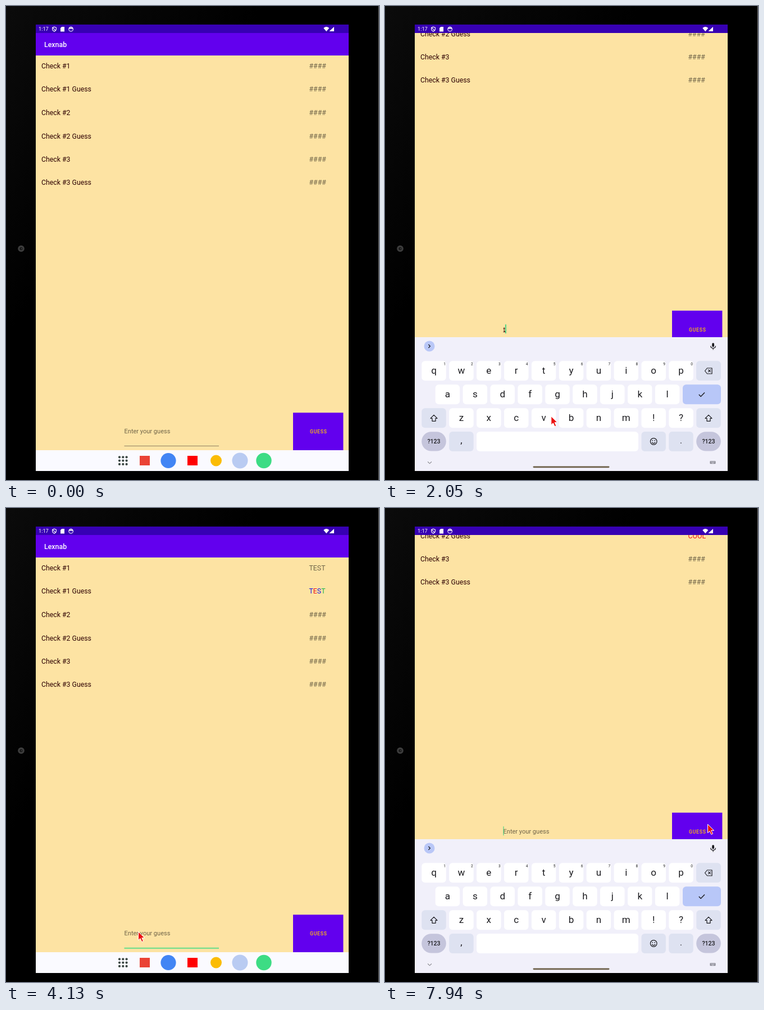
Write an HTML page that moves like this. It is 664x843 px and loops after 8 s.

```html
<!DOCTYPE html>
<html lang="en">
<head>
<meta charset="utf-8">
<title>Word game on a tablet</title>
<style>
  html, body { margin: 0; width: 100%; height: 100%; overflow: hidden; background: #000; }
  svg { display: block; width: 664px; height: 843px; }
  text { font-family: Roboto, sans-serif; white-space: pre; }
</style>
</head>
<body>
<svg id="stage" viewBox="0 0 664 843" xmlns="http://www.w3.org/2000/svg">
  <defs>
    <linearGradient id="shell" x2="1" y2="1">
      <stop offset="0" stop-color="#0b0b0b"/><stop offset=".35" stop-color="#000"/>
    </linearGradient>
    <clipPath id="screen"><rect x="53" y="48" width="557" height="779"/></clipPath>
  </defs>
  <rect width="664" height="843" fill="url(#shell)"/>
  <rect x="53" y="33" width="557" height="794"/>
  <rect x="663" width="1" height="843" fill="#777"/>
  <circle cx="27" cy="431.5" r="5.8" fill="#3d3d3d"/>
  <circle cx="27" cy="431.5" r="2.6" fill="#151515"/>
  <circle cx="27.6" cy="431.5" r="1" fill="#4a4a4a"/>

  <rect x="53" y="33" width="557" height="15" fill="#3700b3"/>
  <text x="58" y="44.3" font-size="9.2" fill="#fff">1:17</text>
  <g fill="none" stroke="#fff" stroke-width="1.1">
    <path d="M86 37.2l3.4 1.3v2.6q0 2.8-3.4 4.2q-3.4-1.4-3.4-4.2v-2.6zM83.5 38.8l5 5"/>
    <circle cx="115.6" cy="41.2" r="3.8"/>
    <path d="M112.2 39.6h6.8" stroke-width="2"/>
  </g>
  <path d="M97 39.3l2.3-2.3h4.7v8.4h-7z" fill="#fff"/>
  <path d="M565.3 39.2q5-4.2 10 0l-5 6zM584 37v8h-8.5z" fill="#fff"/>

  <g clip-path="url(#screen)">
    <g id="app"></g>
    <g id="taskbar"></g>
    <g id="keyboard"></g>
  </g>
  <rect id="handle" x="263.5" y="818.4" width="136" height="2.8" rx="1.4"/>
  <path id="cursor" d="M.5.5V15.8L4 12.6 6.8 18.6 9.5 17.4 6.8 11.5H11.6Z"
        fill="#ec1010" stroke="#fff" stroke-width="1"/>
</svg>
<script>
const LOOP = 8000, PAN = 181.5, KB_H = 238;
const SEND_1 = 3440, SEND_2 = 7880;
const $ = id => document.getElementById(id);
const app = $('app'), taskbar = $('taskbar'), kb = $('keyboard');

function el(parent, tag, attrs, text) {
  const n = document.createElementNS('http://www.w3.org/2000/svg', tag);
  for (const k in attrs) n.setAttribute(k, attrs[k]);
  if (text !== undefined) n.textContent = text;
  parent.appendChild(n);
  return n;
}
const rect = (p, x, y, width, height, fill, rx = 0) => el(p, 'rect', { x, y, width, height, fill, rx });
const dot = (p, cx, cy, r, fill) => el(p, 'circle', { cx, cy, r, fill });
const label = (p, x, y, size, fill, str, more) =>
  el(p, 'text', { x, y, 'font-size': size, fill, ...more }, str);
const mid = { 'text-anchor': 'middle' };
const line = (p, d, stroke = '#1b1b1f', width = 1.2) =>
  el(p, 'path', { d, fill: 'none', stroke, 'stroke-width': width, 'stroke-linejoin': 'round' });
const show = (n, on) => n.setAttribute('visibility', on ? 'inherit' : 'hidden');

// App window
const FAINT = 'rgba(0,0,0,.56)';
rect(app, 53, 48, 557, 742, '#fde3a3');
rect(app, 53, 48, 557, 40, '#6200ee');
label(app, 68, 73.3, 12.4, '#fff', 'Lexnab', { 'font-weight': 500 });
const slots = [111.4, 152.4, 193.6, 235.5, 276.5, 317.5].map((y, i) => {
  label(app, 63, y, 12.3, '#2e0202', `Check #${(i >> 1) + 1}${i % 2 ? ' Guess' : ''}`);
  return label(app, 539.5, i === 2 ? y + .8 : y, 12.3, FAINT, '####');
});

function fill(slot, word, colors) {
  if (slot.dataset.word === word) return;
  slot.dataset.word = word;
  slot.textContent = '';
  [...word].forEach((c, i) => el(slot, 'tspan', { fill: colors ? colors[i] : FAINT }, c));
}

const lift = el(app, 'g', {});
rect(lift, 512, 725, 93, 68, 'rgba(0,0,0,.05)', 2);
rect(lift, 512, 725, 90, 67, 'rgba(0,0,0,.08)', 2);
rect(app, 511, 723.3, 89.4, 66.7, '#6200ee');
label(app, 556.4, 760, 8.6, '#ffc107', 'GUESS',
  { ...mid, 'font-weight': 500, 'letter-spacing': .77 });
const hint = label(app, 210.5, 760.3, 11.05, FAINT, 'Enter your guess');
const typed = label(app, 210.5, 760.3, 11.05, '#2e0202', '');
const composing = rect(app, 210.5, 760.6, 0, 1, '#2e0202');
const caret = rect(app, 210.5, 747.8, 1, 16, '#2fd07c');
const under = rect(app, 210.5, 782, 168.5, 1, '#8e8262');

// Taskbar
rect(taskbar, 53, 790, 557, 37, '#fafaff');
for (let i = 0; i < 9; i++)
  dot(taskbar, 202 + i % 3 * 6.3, 802.3 + Math.floor(i / 3) * 6.3, 2.1, '#3b4743');
rect(taskbar, 238, 800, 18, 17, '#ea4335');
dot(taskbar, 289, 808.5, 13.6, '#4285f4');
rect(taskbar, 323, 800, 18, 17, '#f00');
dot(taskbar, 374, 808.5, 10, '#fbbc04');
dot(taskbar, 416.5, 808.5, 14, '#b9cbf2');
dot(taskbar, 459, 808.5, 13.7, '#3ddc84');

// Keyboard
const STEP = 48.9, KEY = '#dee2f1', INK = '#1b1b1f';
const panel = rect(kb, 53, 589, 557, KB_H, '#f1f0fa');
const caps = el(kb, 'g', {});
const pills = [];
const cap = (cx, cy, w, color) => rect(caps, cx - w / 2, cy - 17.5, w, 35, color, 6);

function letters(str, x, y) {
  [...str].forEach((c, i) => {
    cap(x + i * STEP, y, 43.5, '#fff');
    label(kb, x + i * STEP, y + 5.6, 17, INK, c, mid);
  });
}
letters('qwertyuiop', 87, 648.8);
letters('asdfghjkl', 111.4, 690.8);
letters('zxcvbnm!?', 135.9, 732.8);
[...'1234567890'].forEach((c, i) => label(kb, 106 + i * STEP, 639, 6.5, INK, c, mid));

cap(576, 648.8, 44, KEY);
line(kb, 'M569.5 649l4-5h8.5v10h-8.5zM575.2 646.6l4.6 4.6M579.8 646.6l-4.6 4.6');
cap(564, 690.8, 68, '#b8c7f8');
line(kb, 'M558.8 691l3.4 3.4 6.8-7', INK, 1.4);
for (const x of [87, 576]) {
  cap(x, 732.8, 43.5, KEY);
  line(kb, `M${x} 727.3l6 6h-3v5h-6v-5h-3z`);
  pills.push(rect(kb, x - 21.8, 757.2, 43.6, 34.4, '#c5c5dc', 17));
  label(kb, x, 778.3, 10.6, INK, '?123', { ...mid, 'font-weight': 500 });
}
[135.9, 478.2, 527].forEach(x => cap(x, 774.5, 43.5, KEY));
cap(307, 774.5, 288, '#fff');
label(kb, 135.9, 777.5, 17, INK, ',', mid);
label(kb, 527, 777.5, 15, INK, '.', mid);
line(kb, 'M472.4 774.4a5.8 5.8 0 1 0 11.6 0a5.8 5.8 0 1 0-11.6 0M475.2 776q3 3.6 6 0');
dot(kb, 476.2, 772.8, .9, INK);
dot(kb, 480.2, 772.8, .9, INK);

dot(kb, 79, 605, 9.5, '#b9c7f7');
line(kb, 'M77.4 602l3 3-3 3');
rect(kb, 582.2, 599.2, 3.8, 7.2, INK, 1.9);
line(kb, 'M579.8 604.6q0 4 4.3 4t4.3-4M584.1 608.6v2.8');
line(kb, 'M76 810.5l3.5 3.2 3.5-3.2', '#55555c', 1);
rect(kb, 578.5, 809.3, 10, 5, '#8c8c96', .8);
line(kb, 'M580 811h7M581.5 813h4', '#f1f0fa', .7);

const chip = el(kb, 'g', {});
rect(chip, 259.8, 596, 148.6, 19, '#fff', 6).setAttribute('stroke', '#e2e2ec');
rect(chip, 266.5, 601, 7.4, 9, '#e6ebff', 1).setAttribute('stroke', '#8fa4ea');
line(chip, 'M268.6 600.6h3.2M268.3 604.5h3.8M268.3 607h3.8', '#6d86dc', 1);
label(chip, 279, 608.6, 9.5, INK, 'android:textColor="#2E0202"');

// Timeline: [time, text, underlined letters]
const TYPING = [
  [0, '', 0], [1910, 't', 1], [2520, 'te', 2], [2650, 'tes', 3], [2790, 'test', 4], [SEND_1, '', 0],
  [5130, 'c', 0], [5530, 'co', 1], [5660, 'coo', 2], [6010, 'cool', 3], [6210, 'cool', 4], [SEND_2, '', 0]
];
const POINTER = [
  [130, 437, 817], [270, 368, 790], [480, 285, 773], [750, 274, 748], [1980, 274, 748],
  [2300, 370, 663], [2590, 370, 663], [2900, 500, 590], [3040, 549, 557], [3180, 555, 568],
  [3580, 555, 568], [3850, 330, 680], [4060, 237, 740], [4130, 235, 753], [7070, 235, 753],
  [7280, 410, 640], [7480, 648, 531], [7740, 574, 562]
];
const within = (t, ...spans) => spans.some(([a, b]) => t >= a && t < b);

// cubic-bezier(.4, 0, .2, 1)
function ease(x) {
  if (x <= 0) return 0;
  if (x >= 1) return 1;
  let a = 0, b = 1, s;
  for (let i = 0; i < 20; i++) {
    s = (a + b) / 2;
    const v = 1 - s;
    if (1.2 * v * v * s + .6 * v * s * s + s ** 3 < x) a = s; else b = s;
  }
  return s * s * (3 - 2 * s);
}
const ramp = (t, start, ms) => ease((t - start) / ms);

function pointerAt(t) {
  let i = 0;
  while (i < POINTER.length - 2 && t >= POINTER[i + 1][0]) i++;
  const [t0, x0, y0] = POINTER[i], [t1, x1, y1] = POINTER[i + 1];
  const k = Math.min(1, Math.max(0, (t - t0) / (t1 - t0)));
  return [x0 + (x1 - x0) * k, y0 + (y1 - y0) * k];
}

function draw(t) {
  const pan = ramp(t, 1225, 400) - ramp(t, 3640, 320) + ramp(t, 4632, 400);
  app.setAttribute('transform', `translate(0 ${-PAN * pan})`);

  const up = ramp(t, 1450, 400) - ramp(t, 3600, 320) + ramp(t, 4602, 400);
  const ready = up > .96;
  kb.setAttribute('transform', `translate(0 ${KB_H * (1 - up)})`);
  show(kb, up > 0);
  show(caps, ready);
  panel.setAttribute('fill', ready ? '#f1f0fa' : `rgba(232,233,255,${Math.max(0, up) ** .6})`);
  pills.forEach(p => p.setAttribute('fill', ready ? '#c5c5dc' : '#a5dcae'));
  show(chip, up > 0 && within(t, [4330, SEND_2]));

  const bar = t < 1160 || within(t, [3990, 4470]);
  show(taskbar, bar);
  show($('handle'), !bar);
  $('handle').setAttribute('fill', within(t, [1910, 3600], [5200, LOOP]) ? '#6d6048' : '#d9d5f0');

  const [, word, marked] = TYPING.filter(s => s[0] <= t).pop();
  if (typed.textContent !== word) typed.textContent = word;
  const width = word ? typed.getComputedTextLength() : 0;
  show(hint, !word);
  composing.setAttribute('width', marked ? typed.getSubStringLength(0, marked) : 0);
  caret.setAttribute('x', 210.5 + width);
  caret.setAttribute('width', word ? 1.6 : 1);
  show(caret, t >= 890 && !within(t, [3580, 4400], [6740, 7070]));
  under.setAttribute('fill', t < 820 ? '#8e8262' : '#3ddc84');
  under.setAttribute('height', t < 820 ? 1 : 1.5);

  const first = t >= SEND_1, second = t >= SEND_2;
  const blue = '#1a10e0', red = '#f01414', green = '#18b34c';
  fill(slots[0], first ? 'TEST' : '####');
  fill(slots[1], first ? 'TEST' : '####', first && [blue, red, blue, green]);
  fill(slots[2], second ? 'COOL' : '####');
  fill(slots[3], second ? 'COOL' : '####', second && Array(4).fill(red));
  show(lift, within(t, [3320, 3640], [SEND_2, 7940]));

  const [x, y] = pointerAt(t);
  $('cursor').setAttribute('transform', `translate(${x} ${y})`);
  show($('cursor'), t >= 130 && !within(t, [550, 750]));
}

const start = performance.now();
function tick() {
  draw((performance.now() - start) % LOOP);
  requestAnimationFrame(tick);
}
draw(0);
requestAnimationFrame(tick);
</script>
</body>
</html>
```
